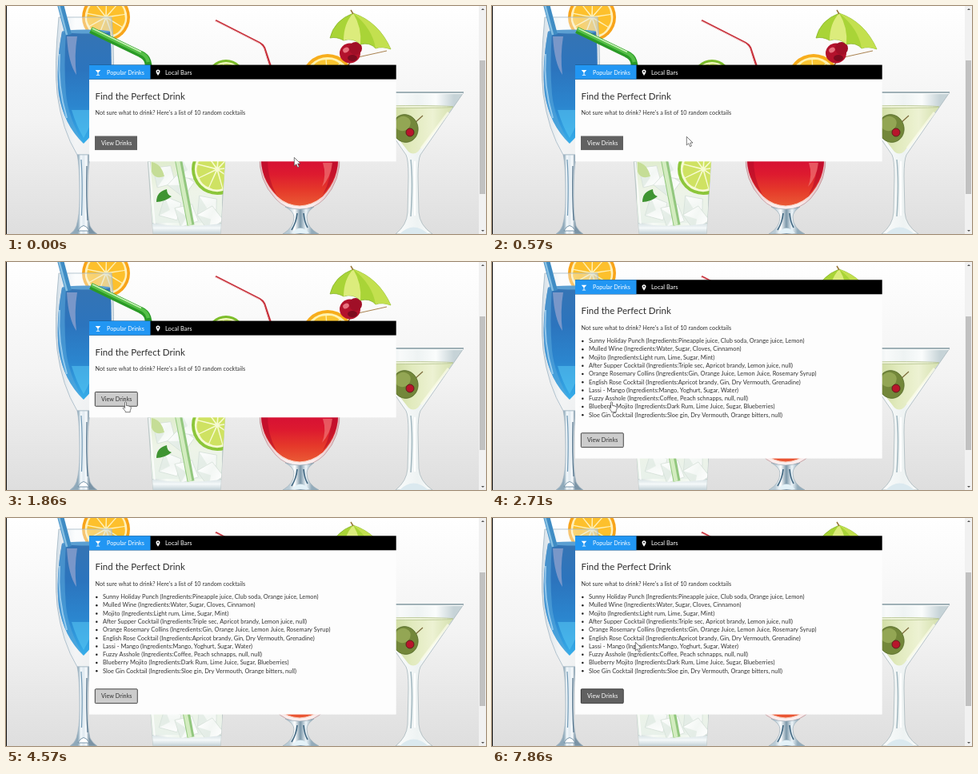
An HTML page with a canvas for the animation above (8 s loop, 600x285 px).

```html
<!DOCTYPE html>
<html lang="en">
<head>
<meta charset="utf-8">
<title>Find the Perfect Drink</title>
<style>
html, body { margin: 0; width: 100%; height: 100%; overflow: hidden; background: #fff; }
canvas { display: block; width: 600px; height: 285px; }
</style>
</head>
<body>
<canvas id="stage" width="600" height="285"></canvas>
<script>
const c = document.getElementById('stage').getContext('2d');
const LOOP = 8000;
const DRINKS = [
  'Sunny Holiday Punch (Ingredients:Pineapple juice, Club soda, Orange juice, Lemon)',
  'Mulled Wine (Ingredients:Water, Sugar, Cloves, Cinnamon)',
  'Mojito (Ingredients:Light rum, Lime, Sugar, Mint)',
  'After Supper Cocktail (Ingredients:Triple sec, Apricot brandy, Lemon juice, null)',
  'Orange Rosemary Collins (Ingredients:Gin, Orange Juice, Lemon Juice, Rosemary Syrup)',
  'English Rose Cocktail (Ingredients:Apricot brandy, Gin, Dry Vermouth, Grenadine)',
  'Lassi - Mango (Ingredients:Mango, Yoghurt, Sugar, Water)',
  'Fuzzy Asshole (Ingredients:Coffee, Peach schnapps, null, null)',
  'Blueberry Mojito (Ingredients:Dark Rum, Lime Juice, Sugar, Blueberries)',
  'Sloe Gin Cocktail (Ingredients:Sloe gin, Dry Vermouth, Orange bitters, null)'
];
// time, shape, tip x, tip y
const POINTER = [
  [0, 'arrow', 360, 189], [140, 'arrow', 294, 163], [280, 'arrow', 292, 163],
  [570, 'arrow', 243, 163], [710, 'arrow', 189.5, 164], [860, 'arrow', 170.5, 171],
  [1000, 'hand', 156, 174.5], [1140, 'hand', 149.5, 174.5], [3430, 'none', 0, 0],
  [7710, 'arrow', 167, 163], [7860, 'arrow', 179, 155]
];

function paint(path, fill, stroke, width = 1) {
  if (fill) { c.fillStyle = fill; c.fill(path); }
  if (stroke) { c.strokeStyle = stroke; c.lineWidth = width; c.stroke(path); }
}
const shape = (d, fill, stroke, width) => paint(new Path2D(d), fill, stroke, width);
function ellipse(x, y, rx, ry, fill, stroke, width, tilt = 0) {
  const p = new Path2D();
  p.ellipse(x, y, rx, ry, tilt, 0, Math.PI * 2);
  paint(p, fill, stroke, width);
}
function rect(x, y, w, h, fill) { c.fillStyle = fill; c.fillRect(x, y, w, h); }
function ramp(x0, y0, x1, y1, ...colors) {
  const g = c.createLinearGradient(x0, y0, x1, y1);
  colors.forEach((color, i) => g.addColorStop(i / (colors.length - 1), color));
  return g;
}
// Large type scaled down keeps fractional letter advances.
function text(s, x, y, size, color) {
  c.save();
  c.translate(x, y);
  c.scale(.1, .1);
  c.font = `${size * 10}px Lato, "Open Sans", sans-serif`;
  c.fillStyle = color;
  c.fillText(s, 0, 0);
  c.restore();
}

function citrus(x, y, r, peel, pith, pulp, turn = 0) {
  ellipse(x, y, r, r, peel);
  ellipse(x, y, r * .88, r * .88, pith);
  for (let i = 0; i < 9; i++) {
    c.save();
    c.translate(x, y);
    c.rotate(turn + i * Math.PI * 2 / 9);
    c.scale(r, r);
    shape('M.08 0L.74 -.25Q.86 0 .74 .25Z', pulp);
    c.restore();
  }
}

function blueGlass() {
  citrus(125, 14, 30, '#f8a41a', '#fff0b8', '#fdc02c', .2);
  shape('M66 14Q60 75 64 110Q70 155 89 186L106 186Q126 155 132 110Q137 75 132 14Z',
    ramp(62, 0, 136, 0, '#c3d3dfc0', '#f8fbfd70', '#f0f6fa50', '#bfd0dcb0'), '#a3b6c4', .8);
  shape('M70 32Q62 75 66 110Q72 148 97 172Q122 148 129 110Q134 75 130 32Z',
    ramp(0, 32, 0, 172, '#3574b4', '#2c74bd', '#2b86cf', '#36aeea'));
  shape('M70 32Q62 75 66 110Q72 148 97 172Q78 140 75 110Q72 75 75 32Z', '#5aa9dc90');
  shape('M82 130Q88 150 97 165Q106 150 112 130Z', '#55c4f290');
  ellipse(100, 32, 30, 2.5, '#5b9fd2');
  shape('M68 -2L78 36', null, '#3f8cc4', 8);
  shape('M66 -2L76 36', null, '#86bfe2', 2.5);
  shape('M76 38L89 38Q85 62 88 86Q78 72 76 38Z', '#9aa6d0b0');
  shape('M67 60Q64 100 76 140', null, '#d2efff90', 2);
  shape('M89 186Q92 198 92 240Q92 262 88 275Q86 281 80 285L114 285Q108 281 105 275Q102 262 102 240Q102 198 106 186Z',
    ramp(90, 0, 104, 0, '#8fa9ba', '#f2f8fb', '#dfe9f0', '#f8fbfd', '#7b94a6'), '#a3b5c2', .7);
  shape('M94 192Q96 220 94.5 262', null, '#6c95b2', 1.2);
  shape('M101 200Q100 240 102 268', null, '#52728a', 1.2);
  shape('M90 281Q97 268 104 281Z', '#ffffff', '#5c7f98', .8);
}

function mojito() {
  shape('M106 30L168 60Q175 63 177 69L179 78', null, '#2a9a26', 8.5);
  shape('M107 29L169 59Q176 62 178 70', null, '#55bf47', 4.5);
  shape('M108 28L169 57.5', null, '#c9f0b8', 1.5);
  citrus(275, 91, 24, '#7cbd2a', '#f2f8c0', '#c3de62');
  const glass = new Path2D('M177 190L184 285L268 285L274 190Z');
  paint(glass, ramp(176, 0, 275, 0, '#c8d4d2', '#f6faf6', '#ebf3e8', '#f5f9f4', '#c3d0cd'), '#b4c2c0', .8);
  c.save();
  c.clip(glass);
  rect(181, 192, 89, 79, ramp(0, 192, 0, 271, '#dfeccd', '#eef4e8', '#e8f1ea'));
  const ice = 'M-14 -8L7 -15L17 5L-4 15Z';
  [[196, 213, .2], [218, 224, -.5], [204, 253, .7], [224, 262, .1], [250, 251, .5], [226, 203, .6], [254, 266, -.2]]
    .forEach(([x, y, turn]) => {
      c.save();
      c.translate(x, y);
      c.rotate(turn);
      shape(ice, ramp(-14, -12, 14, 12, '#ffffff', '#f3f7f4', '#ffffff'), '#d3ded6', .7);
      shape('M-14 -8L-4 15L2 1Z', '#d5e3da80');
      c.restore();
    });
  shape('M182 195Q194 197 198 213Q185 217 182 207Z', '#c5dd96');
  shape('M188 245Q188 232 201 229Q201 236 207 238Q198 245 188 245Z', '#3f9432');
  citrus(264, 204, 32, '#8cc63a', '#f6fad2', '#cfe262', .25);
  shape('M215 190L231 274', null, '#92c77e', 9);
  shape('M214 190L230 274', null, '#d3ecc0', 5);
  c.restore();
  shape('M179 195L186 275', null, '#ffffffc0', 2);
  shape('M183 272Q226 278 269 272L268 285L184 285Z', ramp(0, 270, 0, 285, '#cfdcdf', '#f4f8f9', '#c4d2d8'));
}

function redGlass() {
  shape('M262 18L317 46Q321 48 323 52L331 76', null, '#c8323c', 2.4);
  shape('M261.5 18.8L317 47Q320 49 322 53L329 76', null, '#f6dcdc', 1);
  citrus(402, 93, 33, '#f7ad1c', '#fff3b0', '#fbc531', .1);
  shape('M317 185Q315 218 337 241Q349 254 367 255Q385 254 398 241Q419 218 417 185Z',
    ramp(317, 0, 417, 0, '#e3bcc0', '#faeeee', '#faeeee', '#dfb4b8'), '#b98a8f', .7);
  shape('M319 185Q317 216 339 238Q351 249 367 250Q383 249 396 238Q417 216 415 185Z',
    ramp(0, 190, 0, 250, '#d50f35', '#dd1a2f', '#e5392a', '#ea5a35'));
  shape('M319 188Q318 214 338 236Q326 214 327 188ZM415 188Q416 214 396 236Q408 214 407 188Z', '#b30c2890');
  shape('M396 196L408 196Q406 214 395 226Q401 211 396 196Z', '#f58a8490');
  shape('M340 240Q351 249 367 250Q383 249 394 240', null, '#f9c9b8', 1);
  shape('M349 251Q367 257 385 251Q376 257 376 264Q376 277 391 285L346 285Q360 277 360 264Q360 257 349 251Z',
    ramp(354, 0, 382, 0, '#b9cbd6', '#ffffff', '#7b97a9', '#eef5f9', '#93acbb'), '#93a6b2', .6);
  shape('M364 259Q363 270 357 280M372 259Q373 270 377 277', null, '#3f6680', 1.6);
  shape('M357 284Q368 271 379 284Z', '#e4f2f8');
}

function garnish() {
  shape('M444 44L427 76', null, '#8c5a2e', 1.5);
  shape('M440 64L476 56', null, '#a98250', 1);
  ellipse(430, 59, 13, 12.5, '#b3122c');
  ellipse(437, 53, 8, 8, '#a00f27');
  ellipse(425, 55, 4, 3, '#e8727f', null, 0, -.5);
  ellipse(433, 65, 6, 4, '#7d0b1f');
  shape('M405 40Q410 18 434 9Q466 20 481 54Q470 50 462 53Q455 45 443 48Q434 39 422 43Q413 38 405 40Z', '#a9d437', '#83b02a', .7);
  shape('M434 9Q422 22 422 43Q434 39 443 48Q445 27 434 9Z', '#dcec7c');
  shape('M434 9Q458 28 462 53Q470 50 481 54Q466 20 434 9Z', '#c3e04f');
  shape('M434 10L431 5', null, '#9a783c', 1.5);
}

function martini() {
  shape('M446 108L500 186Q503 192 503 213L502 258Q501 274 487 285L533 285Q517 274 516 258L515 213Q515 192 518 186L572 108Z',
    ramp(470, 0, 560, 0, '#d6e0e2', '#f8fafa', '#eef3f3', '#fafcfc', '#c6d3d7'), '#a9b8bd', .8);
  shape('M459 126L503 182Q509 187 515 182L559 126Z',
    ramp(480, 0, 560, 0, '#cbd99c', '#e1eabd', '#edf2d3', '#d3dfac'));
  ellipse(509, 126, 50, 1.5, '#eef3d8', '#aebd86', .7);
  shape('M446 108H572', null, '#9fb0b6', 1.8);
  shape('M447 109.5H571', null, '#f8fbfb', 1);
  shape('M500 156L521 137', null, '#7d6c3c', 1.2);
  ellipse(499, 153, 16, 17.5, '#73873a', '#54692a', .8, -.3);
  ellipse(496, 147, 10, 9, '#93a654', null, 0, -.4);
  ellipse(505, 158, 5, 5, '#b8152b', '#5f1f1c', 1);
  shape('M553 133L519 178', null, '#fafbe8c0', 3);
  shape('M506 192Q509 220 506 263', null, '#a5bac2', 1.6);
  shape('M511 194L511 262', null, '#ffffff', 2);
  shape('M492 285Q509 268 528 285Z', '#dbe9ef');
}

function scrollbar() {
  rect(591, 0, 9, 285, '#f1f1f1');
  rect(592, 68, 7, 167, '#c1c1c1');
  shape('M594 5L596 3L598 5ZM594 280L596 282L598 280Z', '#505050');
  rect(0, 0, 1, 285, '#111');
}

function button(y, lit, focused) {
  rect(111, y, 53, 17.6, lit ? '#cccccc' : '#616161');
  if (focused) {
    c.strokeStyle = '#333';
    c.lineWidth = .9;
    c.beginPath();
    c.roundRect(111.3, y, 53, 17.8, 1);
    c.stroke();
  }
  text('View Drinks', 119, y + 11.4, 7.2, lit ? '#333' : '#fff');
}

function panel(t) {
  const open = t >= 2710;
  const lift = open ? 51.3 : 0;
  rect(104, 74 - lift, 383.7, 120.3 + lift * 2, '#fdfdfd');
  rect(104, 73.6 - lift, 383.7, 18, '#000');
  rect(104, 73.6 - lift, 76.5, 18, '#2196f3');
  c.save();
  c.translate(0, -lift);
  shape('M111.7 80H118.3L115.5 83.2V86H117.2V86.8H112.8V86H114.5V83.2Z', '#fff');
  shape('M190 87Q187.5 83.4 187.5 82A2.5 2.5 0 0 1 192.5 82Q192.5 83.4 190 87Z', '#fff');
  ellipse(190, 82, .9, .9, '#000');
  text('Popular Drinks', 126, 85.6, 7.25, '#fff');
  text('Local Bars', 199, 85.6, 7.55, '#fff');
  text('Find the Perfect Drink', 111.5, 116.6, 11.55, '#2c2c2c');
  text('Not sure what to drink? Here\'s a list of 10 random cocktails', 111.5, 135.8, 7.25, '#333');
  c.restore();
  if (open) DRINKS.forEach((name, i) => {
    const y = 101.2 + i * 10.27;
    ellipse(113.3, y - 2.3, 1.25, 1.25, '#222');
    text(name, 121, y, 7.47, '#333');
  });
  button(162.5 + lift, t >= 1000 && t < 7570, t >= 1860);
}

function pointer(t) {
  const [, kind, x, y] = POINTER.filter(k => k[0] <= t).pop();
  c.save();
  c.translate(x, y);
  c.lineJoin = 'round';
  if (kind === 'arrow') shape('M.3 .3V11L2.8 8.7L4.6 12.7L6.4 11.9L4.7 8H8Z', '#fff', '#444', .7);
  if (kind === 'hand') shape('M-1 1Q0 -.2 1 1V5L2.8 5.2L4.4 5.7L6 6.3Q7 6.7 6.8 8.5L5.7 11.3V13.2H-.3V12L-3.2 8.5Q-3.6 7.2 -2.2 7.3L-1 8.4Z', '#fff', '#444', .7);
  c.restore();
}

function draw(t) {
  rect(0, 0, 600, 285, ramp(0, 0, 0, 285, '#ffffff', '#f3f3f3', '#dedede'));
  blueGlass();
  mojito();
  redGlass();
  garnish();
  martini();
  panel(t);
  scrollbar();
  pointer(t);
}

const start = performance.now();
function tick() {
  draw((performance.now() - start) % LOOP);
  requestAnimationFrame(tick);
}
tick();
</script>
</body>
</html>
```
